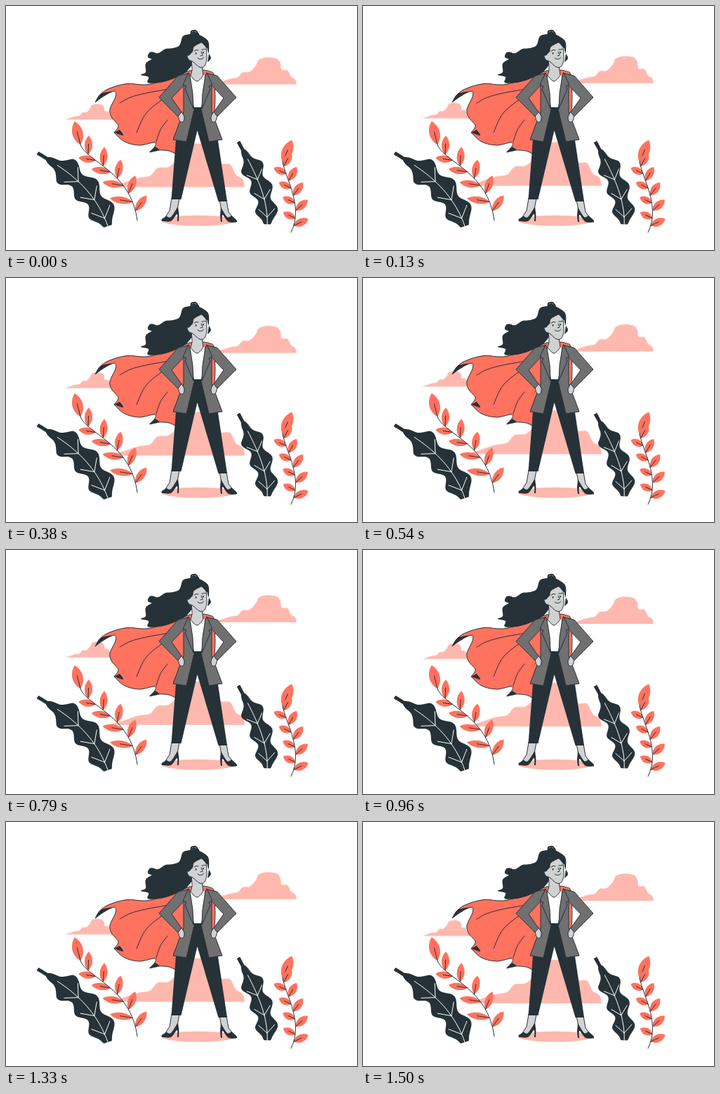
Write an HTML page that moves like this. It is 500x347 px and loops after 1.54 s.

```html
<!DOCTYPE html>
<html lang="en">
<head>
<meta charset="utf-8">
<title>Caped woman</title>
<style>
  html, body { margin: 0; width: 100%; height: 100%; overflow: hidden; background: #fff; }
  svg { display: block; width: 500px; height: 347px; }
  path { stroke-linecap: round; stroke-linejoin: round; }
  .pink { fill: #ffb8ae; }
  .red { fill: #ff725e; }
  .dark { fill: #263238; }
  .skin { fill: #d2d2d2; }
  .coat { fill: #707070; }
  .white { fill: #fff; }
  .ink { stroke: #263238; }
  .line { fill: none; stroke: #263238; }
  .curl { fill: none; stroke: #263238; stroke-width: 2; }
  .vein { fill: none; stroke: #fff; }
  .clouds { animation: bob 1540ms linear -40ms infinite; }
  @keyframes bob {
    0%, 100% { transform: translateY(0); }
    50% { transform: translateY(-10px); }
  }
</style>
</head>
<body>
<!-- data-c: points of a smooth curve, "|" marks a corner -->
<svg viewBox="0 0 500 347">
  <defs>
    <path id="cloud" data-c="0,0 10,-3 25,-8 36,-10 43,-17 53,-18 62,-27 66,-35 77,-38.5 91,-37 97,-30 98.5,-21 107,-20 112,-11 118,-7 120,0 | 0,0"/>
  </defs>
  <g class="clouds pink">
    <use href="#cloud" transform="translate(294 112)"/>
    <use href="#cloud" transform="translate(84 162) scale(.575)"/>
    <use href="#cloud" transform="translate(147 258) scale(1.61)"/>
  </g>

  <ellipse class="pink" cx="274" cy="305.3" rx="52.5" ry="7.5"/>
  <g id="plants"></g>

  <!-- cape -->
  <path class="red ink" data-c="262,92 244,98 224,106 199,112 172,110.5 148,117 135,125 127,137 | 138,129 154,121 156,129 148,147 151,159 160,170 154,180 | 169,193 190,198 212,194 211,202 205,208 | 218,205 232,206 241,210 | 246,190 | 292,165 297,148 298,128 | 296,98 290,93 280,91 262,92"/>
  <path class="dark" data-c="127,137 135,125 154,121 | 142,126 127,137"/>
  <path class="dark" data-c="154,180 162,176 | 167,184 154,180"/>
  <path class="dark" data-c="204,208 212,200 | 218,205 204,208"/>
  <path class="line" data-c="232,118 199,124 177,130 162,138"/>
  <path class="line" data-c="228,129 200,152 186,180"/>
  <path class="line" data-c="230,162 220,176 214,193"/>

  <!-- hair -->
  <path class="dark" data-c="262,40 252,43 247,56 237,60 227,61 217,67 205,67 203,73 208,75 199,82 199,94 192,98 203,101 202,109 219,109 237,104 255,95 265,84 | 266,62 | 284,58 288,66 292,74 287,80 | 289,66 288,50 277,42 268,36 262,40"/>
  <path class="curl" data-c="210,75 203,72 206,66.5 213,68 215,73"/>
  <path class="curl" data-c="264,40 264,36 270,35 274,40"/>

  <!-- legs and shoes -->
  <path class="skin ink" d="M236 273 233 291 225 303 236 301 244 289 247 274Z"/>
  <path class="skin ink" d="M304 276 307 290 313 301 325 303 317 293 314 276Z"/>
  <path class="dark" data-c="245,285 246.5,297 | 246,306 | 244,306 | 243.5,296 235,306 222,306 | 222,303 229,299 | 235,300 245,285"/>
  <path class="dark" data-c="306,286 305,298 | 306,307 | 308,307 | 308.5,297 317,307 329,307.5 | 328,304 321,298 | 315,300 306,286"/>
  <path class="dark" d="M265 143H281L301.5 188 315 278H302.5L272.5 177 249.5 275H235.5L242 190Z"/>

  <!-- shirt and neck -->
  <path class="white" d="M262 98 265 144H281L283 98Z"/>
  <path class="skin ink" data-c="264,76 265,90 263,99 | 272,107 281,99 | 279,84"/>

  <!-- one half of the jacket, mirrored for the other -->
  <g id="half">
    <path class="coat ink" d="M259 96 248 99 253 113 253 150Q252 160 247 166L238 190 257 193 268 147 263 120 262 99Z"/>
    <path class="skin ink" data-c="245,154 247,163 252,165 254,158 250,150 | 245,154"/>
    <path class="coat ink" data-c="259,96 246,99 241,104 | 218,130 | 245,157 | 250,151 | 236,131 | 252,114"/>
    <path class="coat ink" d="M260 95 252 112 257 114 255 118 267 146 266 124 262 99Z"/>
  </g>
  <use href="#half" transform="translate(546) scale(-1 1)"/>

  <!-- face -->
  <path class="skin ink" data-c="264,60 262,69 258,71 261,77 266,79 276,87 283,85 286,74 285,58 | 275,50 264,60"/>
  <path class="dark" data-c="260,70 266,65 268,58 279,52 | 286,60 | 288,52 277,42 262,46 260,70"/>
  <path class="line" d="M268 64Q271 61 274 63M279 62 284 61.500M278 65 280 70 277 71M273 74Q278 78 282 73"/>
  <path class="line" style="stroke-width:2" d="M270.500 67v.5M281 66v.5"/>
</svg>
<script>
  const { PI, cos, sin, sqrt, min, max } = Math;
  const rad = deg => deg * PI / 180;
  const svgPath = (cls, d) => `<path class="${cls}" d="${d}"/>`;

  // Catmull-Rom spline through the points of each stretch
  function curve(text) {
    let d = '', last;
    for (const part of text.split('|')) {
      const pts = part.trim().split(/\s+/).map(p => p.split(',').map(Number));
      if (last) pts.unshift(last);
      else d = 'M' + pts[0];
      for (let i = 0; i < pts.length - 1; i++) {
        const a = pts[i], b = pts[i + 1];
        const before = pts[i - 1] || a, after = pts[i + 2] || b;
        const c1 = a.map((v, k) => v + (b[k] - before[k]) / 6);
        const c2 = b.map((v, k) => v - (after[k] - a[k]) / 6);
        d += `C${c1} ${c2} ${b}`;
      }
      last = pts[pts.length - 1];
    }
    return d;
  }

  // Position and heading at a share of a path's length
  function follow(d) {
    const path = document.createElementNS('http://www.w3.org/2000/svg', 'path');
    path.setAttribute('d', d);
    const len = path.getTotalLength();
    return s => {
      const p = path.getPointAtLength(s * len);
      const a = path.getPointAtLength(s * len - 1), b = path.getPointAtLength(s * len + 1);
      return { x: p.x, y: p.y, dir: Math.atan2(b.y - a.y, b.x - a.x) };
    };
  }

  const polar = (p, angle, r) => `${p.x + r * cos(angle)} ${p.y + r * sin(angle)}`;

  // Almond leaf with a short midrib
  function leaf(base, deg, len, width) {
    const a = rad(deg), at = (x, y) => polar(base, a + Math.atan2(y, x), Math.hypot(x, y));
    const bulge = width * .67;
    return svgPath('red', `M${at(0, 0)}C${at(len * .25, bulge)} ${at(len * .72, bulge)} ${at(len, 0)}` +
      `C${at(len * .72, -bulge)} ${at(len * .25, -bulge)} ${at(0, 0)}`) +
      svgPath('line', `M${at(0, 0)}L${at(len * .55, 0)}`);
  }

  // Stem with one leaf on top and nine alternating along it
  function branch({ stem, top, from, right, bend, left, len, grow }) {
    const at = follow(stem);
    let out = leaf(at(0), top, 34, 15);
    for (let i = 0; i < 9; i++) {
      const s = i / 8, base = at(from + (.9 - from) * s);
      out += i % 2 ? leaf(base, left, len - 4 + grow * s, 10)
                   : leaf(base, right + bend * s * s, len, 11);
    }
    return out + svgPath('line', stem);
  }

  // Dark leaf: three rippled lobes around a spine, veins forking back
  function lobed(spine, width) {
    const at = follow(spine), sides = [[], []];
    for (let s = 0; s <= 1; s += .02) {
      const p = at(s), grow = min(1, max(0, (s - .1) / .2));
      const half = (2.5 + grow * (width - 2.5 + width * .3 * cos(2 * PI * (s - .33) / .25))) * sqrt(1 - s ** 14);
      sides.forEach((side, k) => side.push(polar(p, p.dir + (k ? PI : -PI) / 2, half)));
    }
    let veins = '';
    for (const s of [.47, .7, .9]) {
      const p = at(s);
      for (const turn of [135, -135]) veins += `M${p.x} ${p.y}L${polar(p, p.dir + rad(turn), width * 1.25)}`;
    }
    for (let s = .22; s < .99; s += .04) veins += `${s === .22 ? 'M' : 'L'}${polar(at(s), 0, 0)}`;
    return svgPath('dark', `M${sides[0].join('L')}L${sides[1].reverse().join('L')}Z`) + svgPath('vein', veins);
  }

  document.querySelectorAll('[data-c]').forEach(p => p.setAttribute('d', curve(p.dataset.c)));
  document.getElementById('plants').innerHTML =
    lobed('M45 209C72 226 125 252 146 316', 16) +
    branch({ stem: 'M106 197C115 222 178 235 187 305', top: -104, from: .13,
             right: -88, bend: 34, left: 189, len: 27, grow: 11 }) +
    lobed('M331 193C345 220 375 267 372 313', 13) +
    branch({ stem: 'M394 222C400 250 424 285 406 322', top: -67, from: .06,
             right: -62, bend: 37, left: 205, len: 23, grow: 0 });
</script>
</body>
</html>
```
